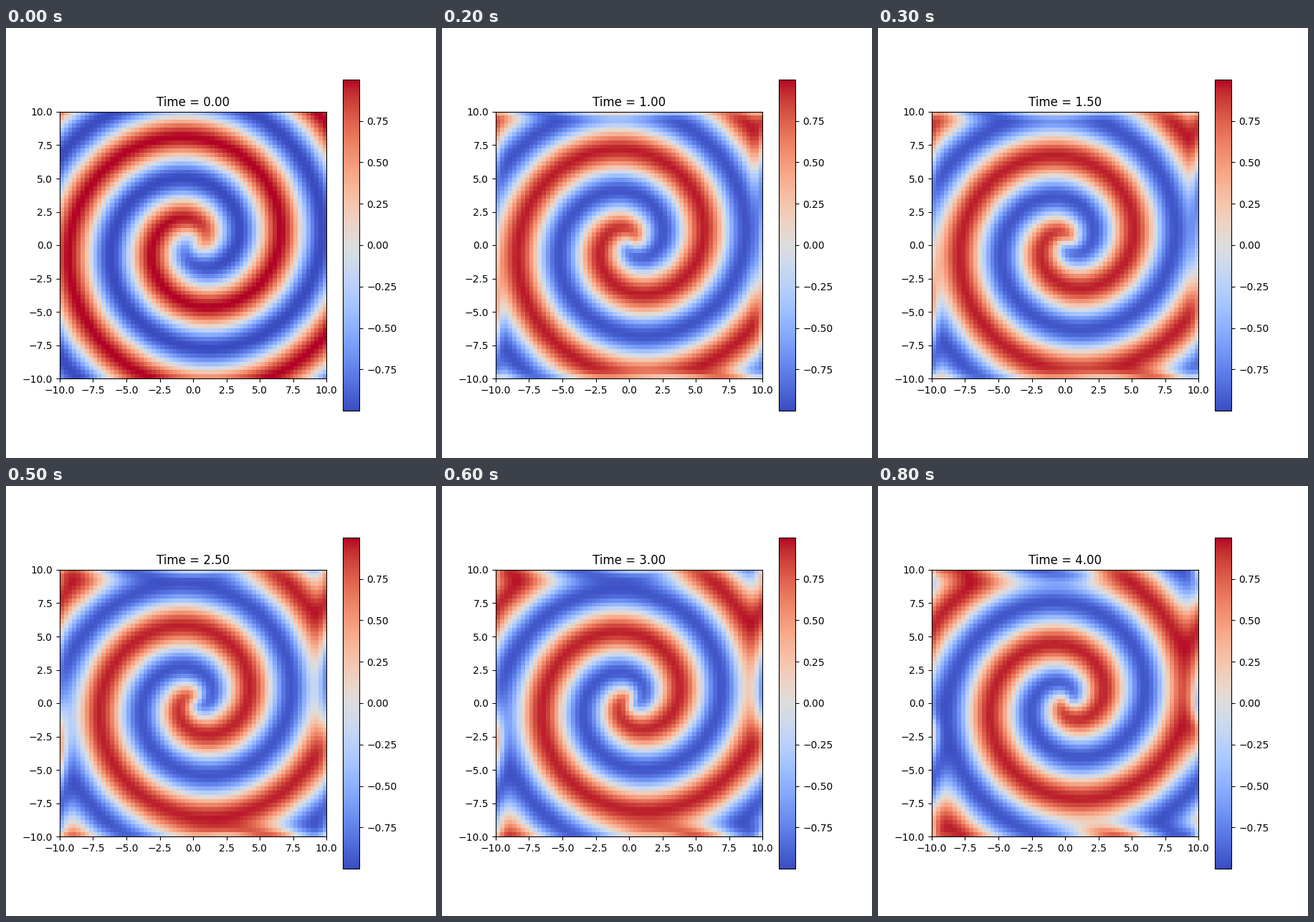
Write a matplotlib script that moves like this. It is 600 px wide and 600 px high and loops after 0.9 s.

```python
import numpy as np
import matplotlib.pyplot as plt
from matplotlib.animation import FuncAnimation

# Lambda-omega reaction-diffusion spiral on a periodic square
N, L = 64, 20.0
BETA, DIFF = 1.0, 0.1
STEP, FRAMES, SUBSTEPS = 0.5, 9, 20

x = np.linspace(-L / 2, L / 2, N, endpoint=False)
X, Y = np.meshgrid(x, x)
k = 2 * np.pi * np.fft.fftfreq(N, d=L / N)
KX, KY = np.meshgrid(k, k)
K2 = KX**2 + KY**2


def rate(z):
    a2 = np.abs(z)**2
    lap = np.fft.ifft2(-K2 * np.fft.fft2(z))
    return (1 - a2 - 1j * BETA * a2) * z + DIFF * lap


def rk4(z, h):
    k1 = rate(z)
    k2 = rate(z + h / 2 * k1)
    k3 = rate(z + h / 2 * k2)
    k4 = rate(z + h * k3)
    return z + h / 6 * (k1 + 2 * k2 + 2 * k3 + k4)


def solve():
    r = np.hypot(X, Y)
    z = np.tanh(r) * np.exp(1j * (np.arctan2(Y, X) - r))
    states = [z.real]
    for _ in range(FRAMES - 1):
        for _ in range(SUBSTEPS):
            z = rk4(z, STEP / SUBSTEPS)
        states.append(z.real)
    return states


states = solve()

fig, ax = plt.subplots(figsize=(6, 6), dpi=100)
img = ax.imshow(states[0], extent=[-L / 2, L / 2, -L / 2, L / 2],
                origin="lower", cmap="coolwarm")
fig.colorbar(img, ax=ax)
title = ax.set_title("Time = 0.00")


def update(i):
    img.set_data(states[i])
    title.set_text(f"Time = {i * STEP:.2f}")
    return img, title


anim = FuncAnimation(fig, update, frames=FRAMES, interval=100,
                     repeat=True, repeat_delay=0)
plt.show()
```
